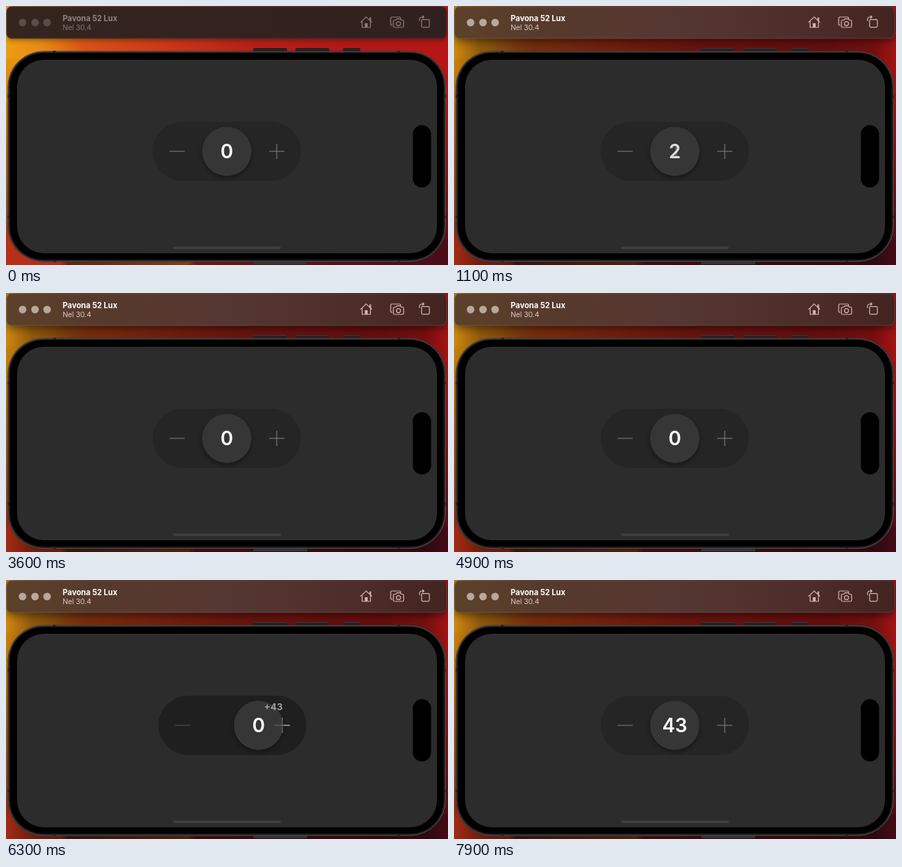
An HTML page with a canvas for the animation above (8000 ms loop, 640 px wide and 376 px high).

```html
<!DOCTYPE html>
<html lang="en">
<head>
<meta charset="utf-8">
<title>Stepper</title>
<style>
html, body { margin: 0; width: 100%; height: 100%; overflow: hidden; background: #000; }
canvas { display: block; width: 640px; height: 376px; }
</style>
</head>
<body>
<canvas id="stage"></canvas>
<script>
const W = 640, H = 376, LOOP = 8000;
const canvas = document.getElementById('stage');
const ctx = canvas.getContext('2d');
const dpr = window.devicePixelRatio || 1;
canvas.width = W * dpr;
canvas.height = H * dpr;

const FONT = 'Inter, Roboto, sans-serif';
const ACTIVE_AT = 300, DRAG_AT = 5050, RELEASE_AT = 6700;
const counts = [[0, 0], [450, 1], [940, 2], [1600, 3], [2700, 2], [3000, 1], [3300, 0], [6720, 43]];

const clamp = v => Math.max(0, Math.min(1, v));
const ease = v => { v = clamp(v); return v * v * (3 - 2 * v); };
const mix = (a, b, k) => a + (b - a) * k;
const grey = v => `rgb(${v},${v},${v})`;

function box(x, y, w, h, r, fill, stroke, line = 1) {
  ctx.beginPath();
  ctx.roundRect(x, y, w, h, r);
  if (fill) { ctx.fillStyle = fill; ctx.fill(); }
  if (stroke) { ctx.strokeStyle = stroke; ctx.lineWidth = line; ctx.stroke(); }
}

function disc(x, y, r, fill) {
  ctx.beginPath();
  ctx.arc(x, y, r, 0, Math.PI * 2);
  ctx.fillStyle = fill;
  ctx.fill();
}

function ramp(x0, y0, x1, y1, stops) {
  const g = ctx.createLinearGradient(x0, y0, x1, y1);
  stops.forEach(([p, c]) => g.addColorStop(p, c));
  return g;
}

function rect(x, y, w, h, fill) {
  ctx.fillStyle = fill;
  ctx.fillRect(x, y, w, h);
}

function text(s, x, y, size, weight, color, align = 'left') {
  ctx.font = `${weight} ${size}px ${FONT}`;
  ctx.textAlign = align;
  ctx.fillStyle = color;
  ctx.fillText(s, x, y);
}

function wallpaper(active) {
  rect(0, 0, W, H, ramp(0, 0, W, 0, [
    [0, '#eb9d14'], [0.08, '#e58a14'], [0.18, '#d75216'], [0.38, '#c93418'],
    [0.56, '#b52018'], [0.8, '#b01817'], [1, '#b81616']]));
  rect(0, 76, 20, 300, ramp(0, 76, 0, 376, [
    [0, '#e6950f'], [0.4, '#c0680f'], [0.78, '#9a4810'], [0.82, '#b42e14'], [1, '#b83016']]));
  rect(0, 340, W, 36, ramp(0, 0, W, 0, [
    [0, '#b83016'], [0.125, '#b42c16'], [0.14, '#60240f'], [0.41, '#8a3a12'],
    [0.43, '#741414'], [0.7, '#5c1014'], [1, '#4a0c18']]));
  rect(600, 76, 40, 300, ramp(0, 76, 0, 376, [
    [0, 'rgba(74,12,24,0)'], [0.4, 'rgba(74,12,24,.25)'], [0.85, 'rgba(74,12,24,.8)'], [1, '#4a0c18']]));
  if (active) {
    const shade = a => `rgba(0,0,0,${a})`;
    rect(0, 0, W, H, ramp(0, 0, W, 0, [
      [0, shade(0.12)], [0.06, shade(0.38)], [0.14, shade(0.45)],
      [0.86, shade(0.42)], [0.95, shade(0.35)], [1, shade(0.1)]]));
  }
}

function icons(color) {
  ctx.strokeStyle = color;
  ctx.lineWidth = 1.2;
  ctx.lineJoin = ctx.lineCap = 'round';
  const line = d => ctx.stroke(new Path2D(d));
  line('M513.5 23.6 L521.5 15.9 L529.7 23.6 M515.6 22.5 V31 H527.6 V22.5 M527 20.5 V17.2 H528 V21.6');
  rect(519.6, 25, 4, 6, color);
  line('M559 28 Q557 28 557 26 V18 Q557 16 559 16 H569 Q571.5 16 571.5 18');
  line('M562.6 20.5 H564.5 L565.8 18.7 H571 L572.3 20.5 H574 Q575.7 20.5 575.7 22.2 V29.2 Q575.7 31 574 31 H562.6 Q560.9 31 560.9 29.2 V22.2 Q560.9 20.5 562.6 20.5 Z');
  ctx.beginPath();
  ctx.arc(568.3, 25.6, 3, 0, Math.PI * 2);
  ctx.stroke();
  box(601.8, 19.6, 11.2, 11.2, 1.5, null, color, 1.2);
  line('M598.7 21.5 V19.8 Q598.7 16 602.5 16 H605 M603.2 14.2 L605.2 16 L603.2 17.8');
}

function titleBar(active) {
  ctx.save();
  ctx.shadowColor = active ? 'rgba(0,0,0,.55)' : 'rgba(0,0,0,.3)';
  ctx.shadowBlur = (active ? 14 : 6) * dpr;
  ctx.shadowOffsetY = 3 * dpr;
  const fill = active
    ? ramp(0, 0, 638, 0, [[0, '#5c4129'], [0.2, '#573a2d'], [0.5, '#553731'], [0.8, '#4d2d29'], [1, '#422421']])
    : ramp(0, 0, 638, 0, [[0, '#35251e'], [0.5, '#33221f'], [1, '#30201f']]);
  box(0.5, 0.5, 638, 47, 8, fill);
  ctx.restore();
  box(1, 1, 637, 46, 7.5, null, active ? 'rgba(255,225,205,.13)' : 'rgba(255,225,205,.08)');
  [24, 42, 59.5].forEach(x => disc(x, 24, 5.5, active ? '#b9a79b' : '#5a4c49'));
  text('Pavona 52 Lux', 82, 22.2, 11.2, 700, active ? '#fff' : '#8f8481');
  text('Nel 30.4', 82, 34.7, 10.3, 400, active ? '#d8cbc4' : '#83766f');
  icons(active ? '#d6bab0' : '#957e77');
}

function phone(active) {
  [[358, 49], [419, 49], [488, 25]].forEach(([x, w]) => {
    box(x, 61, w, 8, 1.5, '#29201f');
    if (active) rect(x + 1, 61, w - 2, 1, '#403636');
  });
  box(358, 368, 78, 7, 1.5, '#343437');
  box(2.5, 65.5, 634.5, 306, 52, '#1c1c1e');
  box(3.2, 66.2, 633.1, 304.6, 51.3, null, '#565658');
  [[68, 65], [567, 65], [68, 369.5], [567, 369.5]].forEach(([x, y]) => rect(x, y, 4, 2, '#222224'));
  [129, 304].forEach(y => { rect(2.5, y, 2, 4, '#222224'); rect(635, y, 2, 4, '#222224'); });
  box(6, 68.5, 627.5, 299.5, 48, '#000');
  box(16, 78, 608, 281, 39, '#2c2c2c');
  box(589, 173, 26.5, 90.5, 13.25, '#000');
  box(242, 349.2, 156, 3.6, 1.8, '#404040');
}

// Rises while dragging, then settles back with a small spring.
function dragAmount(t) {
  if (t < DRAG_AT) return 0;
  if (t < RELEASE_AT) return ease((t - DRAG_AT) / 450);
  const s = (t - RELEASE_AT) / 1000;
  return s > 1 ? 0 : Math.exp(-9 * s) * Math.cos(10 * s);
}

function plus(x, color) {
  rect(x - 11, 210.5, 22, 1, color);
  rect(x - 0.5, 200, 1, 22, color);
}

function number(t, x) {
  let i = counts.length - 1;
  while (counts[i][0] > t) i--;
  const k = i ? ease((t - counts[i][0]) / 220) : 1;
  const put = (n, a) => text(n, x, 221.2, 28, 600, `rgba(255,255,255,${a})`, 'center');
  if (k < 1) put(counts[i - 1][1], 1 - k);
  put(counts[i][1], k);
}

function stepper(t) {
  const d = dragAmount(t), k = clamp(d);
  const mid = 319.7 + 8 * d, knob = 319.7 + 46 * d;
  box(mid - 107.2, 168, 214.5, 86, 43, grey(mix(37, 31, k)));
  rect(mid - 83, 210.5, 22, 1, grey(mix(132, 85, k)));
  plus(mid + 72.3, grey(mix(136, 245, k)));

  ctx.save();
  ctx.shadowColor = 'rgba(0,0,0,.4)';
  ctx.shadowBlur = 7 * dpr;
  ctx.shadowOffsetY = 3 * dpr;
  disc(knob, 211, 35.7, '#363636');
  ctx.restore();

  if (k > 0) {
    ctx.save();
    ctx.beginPath();
    ctx.arc(knob, 211, 35.7, 0, Math.PI * 2);
    ctx.clip();
    plus(mid + 72.3, `rgba(255,255,255,${0.25 * k})`);
    ctx.restore();
  }

  number(t, knob);

  const n = Math.round(43 * Math.pow(clamp((t - DRAG_AT - 150) / 1000), 1.4));
  if (n && k > 0) {
    const a = t < RELEASE_AT ? 1 : 1 - ease((t - RELEASE_AT) / 200);
    text('+' + n, knob + 21.5, 188.8, 13.5, 600, `rgba(170,170,170,${a})`, 'center');
  }
}

function draw(now) {
  const t = now % LOOP;
  const active = t >= ACTIVE_AT;
  ctx.setTransform(dpr, 0, 0, dpr, 0, 0);
  wallpaper(active);
  titleBar(active);
  phone(active);
  stepper(t);
}

const start = performance.now();
function tick() {
  draw(performance.now() - start);
  requestAnimationFrame(tick);
}
tick();
</script>
</body>
</html>
```
